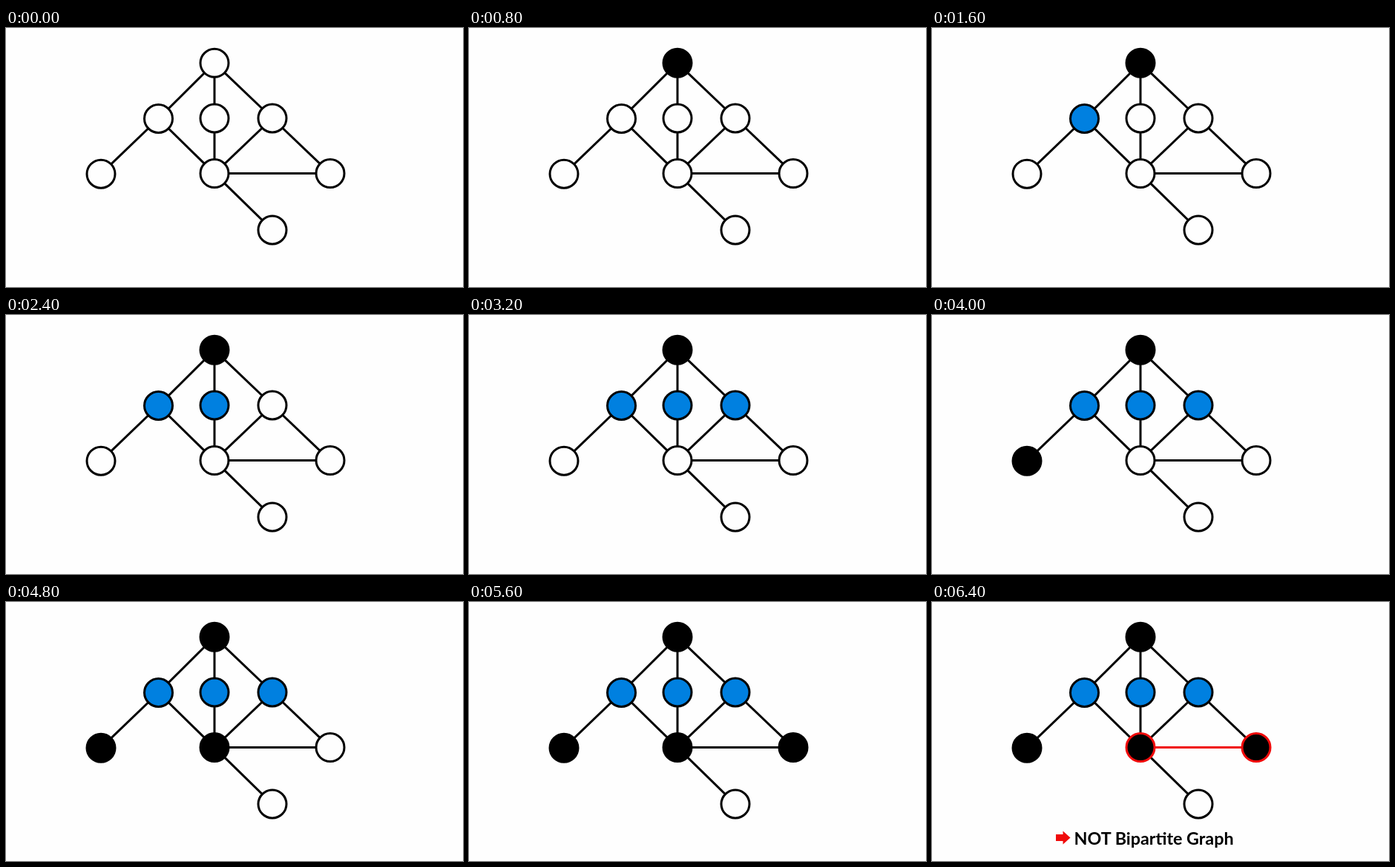
Write an HTML page that moves like this. It is 616 px wide and 350 px high and loops after 7900 ms.

```html
<!DOCTYPE html>
<html lang="en">
<head>
<meta charset="utf-8">
<title>Bipartite check</title>
<style>
  html, body { margin: 0; width: 100%; height: 100%; overflow: hidden; background: #fefefe; }
  svg { display: block; width: 100%; height: 100%; }
  line, circle { stroke: #000; stroke-width: 3; }
  circle { fill: #fefefe; }
  .clash { stroke: #f00a0a; }
  #verdict { visibility: hidden; }
  #verdict path { fill: #f00a0a; }
  text { font: bold 23.3px Lato, Carlito, sans-serif; }
</style>
</head>
<body>
<svg viewBox="0 0 616 350">
  <g id="edges"></g>
  <g id="nodes"></g>
  <g id="verdict">
    <path d="M167 314H176.5V309.5L186.5 318.5L176.5 327.5V323H167Z"/>
    <text x="191.5" y="328">NOT Bipartite Graph</text>
  </g>
</svg>
<script>
const LOOP = 7900, STEP = 800;
const BLACK = '#000', BLUE = '#0080e0', BLANK = '#fefefe';

const nodes = {
  A: [281, 47.3], B: [205.5, 122.5], C: [281, 122], D: [359, 122],
  E: [128, 197.2], F: [281, 196.6], G: [437, 196.6], H: [359, 273]
};
const edges = ['AB', 'AC', 'AD', 'BE', 'BF', 'CF', 'DF', 'DG', 'FG', 'FH'];

// One node is coloured per step, then the conflict is shown.
const visits = [
  ['A', BLACK], ['B', BLUE], ['C', BLUE], ['D', BLUE],
  ['E', BLACK], ['F', BLACK], ['G', BLACK]
];
const clashing = ['F', 'G', 'FG'];

const parts = {};
const verdict = document.getElementById('verdict');

function add(group, tag, attrs) {
  const el = document.createElementNS('http://www.w3.org/2000/svg', tag);
  for (const key in attrs) el.setAttribute(key, attrs[key]);
  return document.getElementById(group).appendChild(el);
}

for (const id of edges) {
  const [x1, y1] = nodes[id[0]], [x2, y2] = nodes[id[1]];
  parts[id] = add('edges', 'line', { x1, y1, x2, y2 });
}
for (const id in nodes) {
  const [cx, cy] = nodes[id];
  parts[id] = add('nodes', 'circle', { cx, cy, r: 19 });
}

let shown = -1;
function show(step) {
  if (step === shown) return;
  shown = step;
  visits.forEach(([id, color], i) => {
    parts[id].style.fill = i < step ? color : BLANK;
  });
  const done = step > visits.length;
  for (const id of clashing) parts[id].classList.toggle('clash', done);
  verdict.style.visibility = done ? 'visible' : 'hidden';
}

const start = performance.now();
function tick() {
  const t = (performance.now() - start) % LOOP;
  show(Math.min(Math.floor(t / STEP), visits.length + 1));
  requestAnimationFrame(tick);
}
tick();
</script>
</body>
</html>
```
